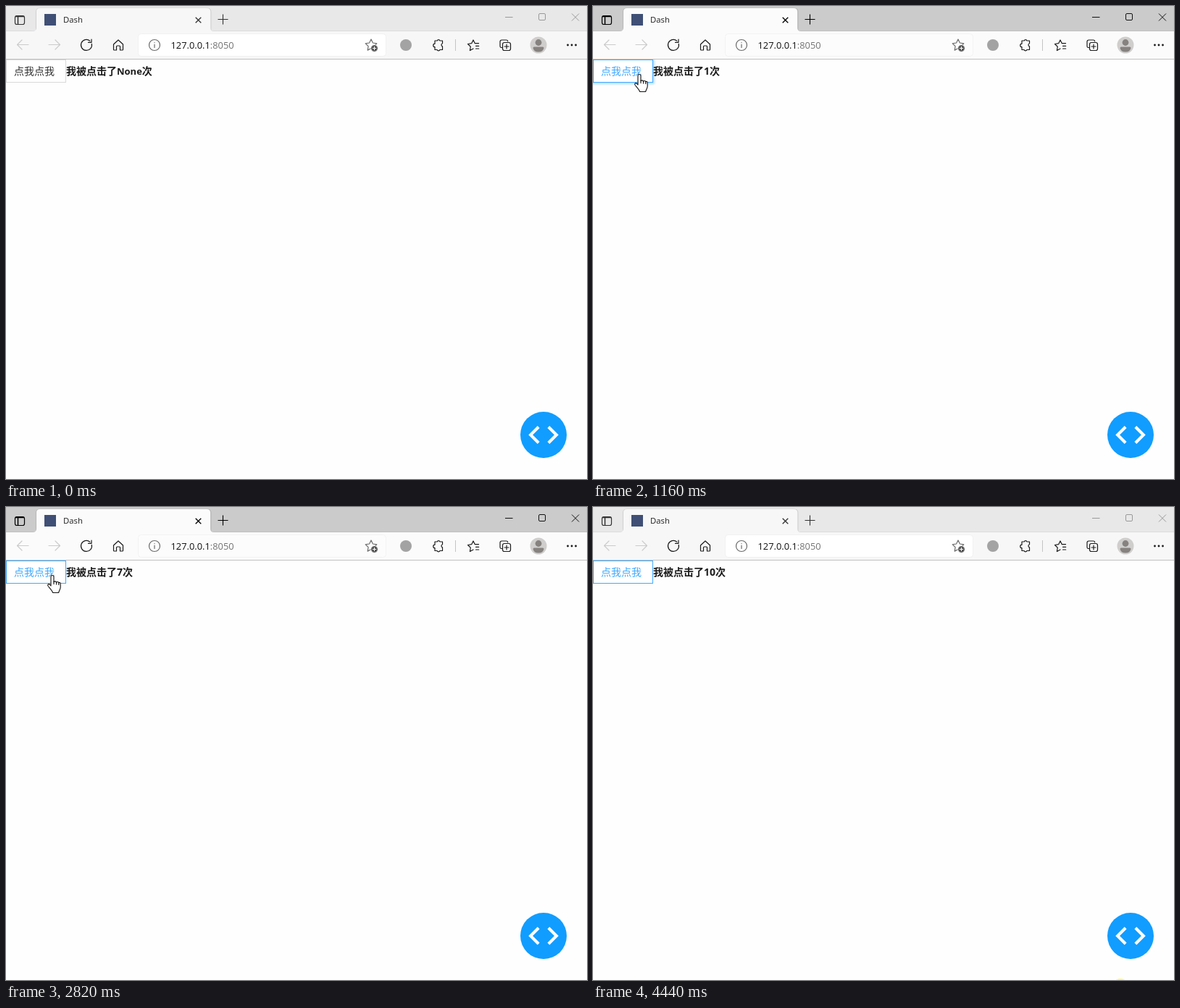
Write an HTML page that moves like this. It is 802 px wide and 654 px high and loops after 4480 ms.

```html
<!DOCTYPE html>
<html lang="zh">
<head>
<meta charset="utf-8">
<title>Dash</title>
<style>
html, body { margin: 0; width: 100%; height: 100%; overflow: hidden; background: #fefefe; }
svg { display: block; width: 802px; height: 654px; animation: focus 4480ms step-end infinite; }
text { font-family: "Open Sans", "Noto Sans CJK SC", "Noto Sans CJK", sans-serif; }
.cjk { font-family: "Noto Sans CJK SC", "Noto Sans CJK", sans-serif; font-size: 14px; }
.strip { fill: var(--strip); }
.bar { fill: var(--bar); }
.field { fill: var(--field); stroke: var(--edge); }
.ctl { stroke: var(--ctl); }
.line { fill: none; stroke: #1b1b1b; stroke-width: 1.2; stroke-linejoin: round; stroke-linecap: round; }
.dim { stroke: #cbcbcb; }
.mid { stroke: #6b6b6b; }
.btn { animation: hover 4480ms linear infinite; }
.glow { animation: glow 4480ms linear infinite; filter: blur(1.4px); }

/* window gains and loses focus */
@keyframes focus {
  0%, 99.107%, 100% { --strip: #e8e8e8; --bar: #f7f7f7; --field: #fff; --edge: #f1f1f1; --ctl: #999; --tabicon: #333; }
  18.527% { --strip: #cbcbcb; --bar: #fbfbfb; --field: #fcfcfc; --edge: #f3f3f3; --ctl: #111; --tabicon: #000; }
}
@keyframes hover {
  0%, 10.7% { stroke: #d9d9d9; color: #333; }
  16.5%, 100% { stroke: #40a9ff; color: #40a9ff; }
}
@keyframes glow {
  0%, 21.3% { opacity: 0; }
  24%, 32.8% { opacity: 1; }
  33%, 35.5% { opacity: .3; }
  37.2%, 43% { opacity: 1; }
  43.1%, 48.4% { opacity: 0; }
  50.5%, 58.9% { opacity: 1; }
  59.5%, 71.9% { opacity: 0; }
  73%, 75% { opacity: .7; }
  76.6%, 100% { opacity: 0; }
}
</style>
</head>
<body>
<svg viewBox="0 0 802 654">
  <rect width="802" height="654" fill="#fefefe"/>

  <!-- tab strip -->
  <rect class="strip" width="802" height="35"/>
  <rect y="34" width="802" height="1" fill="#000" opacity=".05"/>
  <path d="M41.5 35V8q0-5 5-5H278q5 0 5 5V35" fill="none" stroke="#000" stroke-opacity=".1"/>
  <path class="bar" d="M0 35H37q5 0 5-5V8q0-5 5-5H277q5 0 5 5V30q0 5 5 5H802V73H0z"/>
  <g fill="none" style="stroke:var(--tabicon)">
    <rect x="12.5" y="13.5" width="13" height="12" rx="2.5" stroke-width="1.2"/>
    <path d="M13 14.6H25M16.5 15V25" stroke-width="1.5"/>
    <path d="M261.7 15.7l7.6 7.6m0-7.6l-7.6 7.6" stroke-width="1.3"/>
    <path d="M292.5 18.5h14m-7-7v14" stroke-width="1.1"/>
  </g>
  <rect x="53" y="11" width="16" height="16" fill="#3f4f75"/>
  <text x="79" y="23" font-size="11.3" fill="#222">Dash</text>
  <g class="ctl" fill="none" stroke-width="1">
    <path d="M689 15.5h10.5M781 10.5l10 10m0-10l-10 10"/>
    <rect x="735.5" y="10.5" width="9" height="9" rx="1.5"/>
  </g>

  <!-- toolbar -->
  <rect y="73" width="802" height="1" fill="#c1c1c1"/>
  <rect class="field" x="182.5" y="38.5" width="342" height="31" rx="4"/>
  <g class="line">
    <path class="dim" d="M31 53.5H15.5m6.5-6.5l-6.5 6.5 6.5 6.5M59 53.5H74.5m-6.5-6.5l6.5 6.5-6.5 6.5"/>
    <path d="M118.3 52.3A7.5 7.5 0 1 1 115.8 48.2M118 46v4.3h-4.5"/>
    <path d="M148.5 53l6.5-6 6.5 6v7.2q0 .8-.8.8h-3.2v-5q0-1-1-1h-3q-1 0-1 1v5h-3.2q-.8 0-.8-.8z"/>
    <circle class="mid" cx="205" cy="54" r="7.5"/>
    <path class="mid" d="M205 53.2v4.3M205 50.4v.2"/>
    <path id="star" class="mid" d="M504 46l2.4 5 5.4.8-3.9 3.8.9 5.5-4.8-2.6-4.8 2.6.9-5.5-3.9-3.8 5.4-.8z"/>
    <path d="M592 48h3.2a2 2 0 0 1 3.8 0h3.5v3.7a2.2 2.2 0 0 0 0 4.2v4.6h-3.6a2 2 0 0 1-3.8 0H592v-3.8a2.2 2.2 0 0 1 0-4.5z"/>
    <path d="M645 59l-4.6 2.5.9-5.3-3.8-3.7 5.2-.8 2.3-4.7 2.3 4.7h5.2M648.5 55.3h4.2M648.5 59h4.2"/>
    <path d="M684.5 57.5h-1q-1.500-.2-1.500-2v-6q0-2.500 2.500-2.500h6q2 0 2.200 1.800"/>
    <rect x="685.5" y="50.500" width="11" height="11" rx="2.500"/>
    <path d="M691 53v6m-3-3h6"/>
  </g>
  <circle cx="508.500" cy="58.500" r="4.800" fill="#555" stroke="#fff" stroke-width=".8"/>
  <path d="M506 58.500h5m-2.500-2.500v5" stroke="#fff"/>
  <circle cx="552" cy="54" r="8" fill="#a3a3a3"/>
  <rect x="620" y="46" width="1" height="16" fill="#c4c4c4"/>
  <circle cx="735" cy="54" r="11.500" fill="#d0cecd"/>
  <circle cx="735" cy="50.500" r="4.400" fill="#858280"/>
  <path d="M727.500 58q0-1.500 1.500-1.500h12q1.500 0 1.500 1.500-1 5.500-7.500 5.500t-7.500-5.500z" fill="#858280"/>
  <g fill="#1b1b1b"><circle cx="775.500" cy="54" r="1.400"/><circle cx="781" cy="54" r="1.400"/><circle cx="786.500" cy="54" r="1.400"/></g>
  <text x="227.500" y="58.700" font-size="12.850" fill="#111">127.0.0.1<tspan fill="#737373">:8050</tspan></text>

  <!-- page -->
  <svg y="74" width="802" height="580" viewBox="0 74 802 580" style="animation:none;width:802px;height:580px">
    <rect class="glow" x="-2" y="73" width="87" height="35" rx="2" fill="#b5dcff"/>
    <g class="btn">
      <rect x=".5" y="74.500" width="82" height="31" fill="#fff"/>
      <text class="cjk" x="11" y="95" fill="currentColor" stroke="none">点我点我</text>
    </g>
    <text class="cjk" x="83" y="95" font-weight="700" fill="#1c1c1c">我被点击了<tspan id="count" font-family="Open Sans, sans-serif">None</tspan>次</text>
    <circle cx="742" cy="593" r="32" fill="#119dff"/>
    <path transform="translate(742 593) scale(2.08) translate(-12 -12)" fill="#fff"
      d="M9.4 16.6L4.8 12l4.600-4.600L8 6l-6 6 6 6zM14.600 16.600L19.200 12l-4.600-4.600L16 6l6 6-6 6z"/>
  </svg>

  <circle id="halo" r="11" fill="#fff000" opacity=".55"/>
  <g id="cursor" fill="#fff" stroke="#111" stroke-width="1.1" stroke-linejoin="round">
    <path id="arrow" d="M0 0V16l3.700-3.500 2.600 6 2.200-1-2.600-5.800h5.200z"/>
    <g id="hand">
      <path d="M-2 1.500a2 2 0 0 1 4 0V8.500c1-1 3-.8 3.500.5c1-1 3-.6 3.300.8c1-.8 2.400-.2 2.400 1.200v5c0 3-2 4-2.500 7.500h-8c-1-3-4-6-6.500-9c-1.500-2 .5-4 2.500-2l1.300 1.500z"/>
      <path d="M2 8v4M5.500 9v3.500M8.800 10v3" fill="none"/>
    </g>
  </g>
</svg>
<script>
const LOOP = 4480, TICK = 40;
const $ = id => document.getElementById(id);
const [count, halo, cursor, arrow, hand] = ["count", "halo", "cursor", "arrow", "hand"].map($);

// time, x, y
const path = [
  [40, 617, 474], [80, 385, 186], [120, 330, 45], [160, 290, 16], [340, 290, 16],
  [400, 190, 58], [480, 82, 92], [560, 68, 97], [680, 64, 95], [3700, 64, 95],
  [3760, 130, 140], [3840, 430, 335], [3920, 773.5, 569.5], [4000, 775, 592],
  [4100, 771, 622], [4200, 744, 646], [4260, 728, 663]
];
// press, release
const clicks = [
  [830, 930], [1470, 1570], [2080, 2170], [2230, 2320], [2410, 2500],
  [2560, 2640], [2700, 2790], [2840, 2930], [2990, 3080], [3150, 3220]
];

function place(t) {
  const i = path.findIndex(p => p[0] > t);
  if (i < 0) return path[path.length - 1].slice(1);
  if (i === 0) return path[0].slice(1);
  const [t0, x0, y0] = path[i - 1], [t1, x1, y1] = path[i];
  const k = (t - t0) / (t1 - t0);
  return [x0 + (x1 - x0) * k, y0 + (y1 - y0) * k];
}

const show = (el, on) => el.setAttribute("visibility", on ? "visible" : "hidden");

function draw(t) {
  const tick = t - t % TICK;
  const [x, y] = place(tick);
  const over = x < 83 && y > 74 && y < 106;
  cursor.setAttribute("transform", `translate(${x} ${y})`);
  show(arrow, tick >= 40 && !over);
  show(hand, tick >= 40 && over);

  const leaving = t >= 4380;
  halo.setAttribute("cx", leaving ? 728 : 65);
  halo.setAttribute("cy", leaving ? 663 : 95);
  show(halo, leaving || clicks.some(([a, b]) => t >= a && t < b));

  const n = clicks.filter(c => t >= c[1]).length;
  count.textContent = n || "None";
  count.style.fontSize = n ? "14px" : "13px";
}

let start;
function frame(now) {
  start ??= now;
  draw((now - start) % LOOP);
  requestAnimationFrame(frame);
}
draw(0);
requestAnimationFrame(frame);
</script>
</body>
</html>
```
